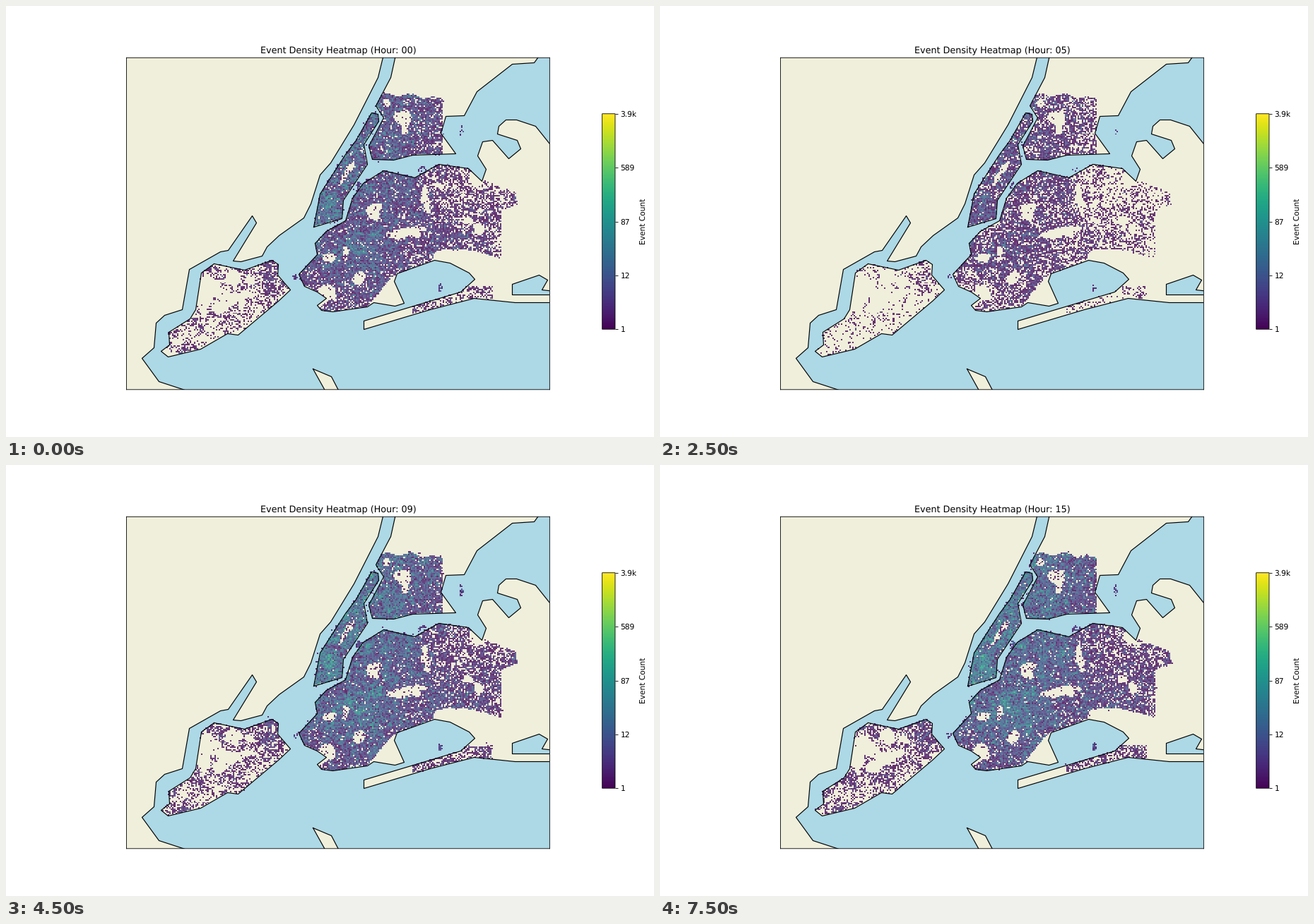
A matplotlib script for the animation above (8000 ms loop, 917 by 611 pixels).

```python
import numpy as np
import matplotlib.pyplot as plt
from matplotlib.animation import FuncAnimation
from matplotlib.cm import ScalarMappable
from matplotlib.colors import Normalize
from matplotlib.path import Path

W, H, DPI = 917, 611, 64
S = 76.4 / DPI                      # keeps text and lines at 12 x 8 inch proportions
HOURS = 16
LAND, WATER = "#f0efdb", "#add8e6"
COLS, ROWS = 250, 195
X0, X1, Y0, Y1 = 215, 725.5, 118, 499

# Map frame: a 0.70 x 0.55 degree window centred in the default subplot area
TOP, BOTTOM = .12 * H, .89 * H
HALF = (BOTTOM - TOP) * .70 / .55 / 2
LEFT, RIGHT = .5125 * W - HALF, .5125 * W + HALF

# Key points of the coast, in stage pixels
MAINLAND = [
    (160, 60), (536, 60), (526, 101), (492, 168), (459, 222), (444, 239), (431, 280),
    (421, 300), (386, 325), (369, 341), (362, 354), (332, 362), (321, 361), (354, 307),
    (348, 297), (314, 346), (303, 348), (259, 373), (249, 430), (224, 438), (212, 449),
    (209, 484), (192, 499), (216, 532), (262, 547), (160, 555)]
UPTOWN = [
    (553, 60), (544, 101), (523, 141), (534, 158), (513, 198), (518, 217), (548, 218),
    (575, 211), (636, 209), (615, 180), (622, 156), (648, 155), (666, 121), (716, 82),
    (747, 80), (760, 62)]
MIDTOWN = [
    (435, 313), (444, 266), (480, 210), (495, 190), (517, 151), (526, 153), (527, 163),
    (506, 196), (511, 224), (477, 275), (475, 301)]
WEST_ISLE = [
    (294, 365), (337, 374), (376, 360), (385, 366), (384, 381), (402, 402), (385, 418),
    (328, 466), (313, 464), (275, 486), (229, 497), (219, 489), (231, 480), (230, 462),
    (260, 443), (268, 430), (276, 378)]
CITY_NORTH = [
    (437, 336), (453, 319), (480, 304), (490, 272), (505, 251), (534, 233), (578, 243),
    (612, 224), (654, 230)]
SOUND = [
    (673, 248), (679, 231), (667, 212), (674, 192), (688, 190), (711, 216), (728, 202),
    (723, 190), (695, 181), (697, 170), (707, 161), (722, 161), (749, 170), (785, 215)]
OCEAN = [
    (785, 405), (758, 402), (766, 388), (754, 381), (716, 394), (716, 409), (785, 409),
    (785, 420), (720, 420), (662, 414), (600, 430), (506, 458), (506, 446), (643, 405)]
BAY = [
    (663, 387), (655, 378), (628, 364), (606, 360), (553, 379), (549, 390), (563, 421),
    (550, 425), (520, 420)]
CITY_SOUTH = [
    (511, 426), (462, 433), (446, 431), (440, 424), (453, 414), (440, 405), (422, 397),
    (414, 380), (440, 352)]
CITY_EAST = [
    (668, 244), (721, 264), (723, 281), (700, 290), (700, 358), (648, 344), (609, 346),
    (604, 360), (548, 382), (519, 416)]
HOOK = [(434, 514), (460, 525), (473, 550), (454, 550)]
LONG_ISLE = CITY_NORTH + SOUND + OCEAN + BAY + CITY_SOUTH

# Parks (x, y, half length, half width, angle) and small islets (x, y, rx, ry)
PARKS = [
    (481, 238, 18, 4, -57), (480, 350, 10, 4, 90), (459, 356, 9, 6, -15),
    (564, 321, 29, 6, -14), (519, 288, 13, 6, -20), (594, 275, 17, 6, 82),
    (564, 170, 14, 4, 90), (281, 405, 27, 12, 98), (311, 422, 32, 9, -28)]
ISLETS = [(644, 178, 3, 9), (590, 234, 7, 7), (614, 400, 3, 6), (677, 403, 10, 6),
          (409, 383, 5, 4), (499, 257, 4, 8)]

gx, gy = np.meshgrid(X0 + (np.arange(COLS) + .5) * (X1 - X0) / COLS,
                     Y0 + (np.arange(ROWS) + .5) * (Y1 - Y0) / ROWS)


def inside(points):
    return Path(points).contains_points(np.c_[gx.ravel(), gy.ravel()]).reshape(gx.shape)


def ellipse(x, y, a, b, deg=0):
    c, s = np.cos(np.radians(deg)), np.sin(np.radians(deg))
    u, v = c * (gx - x) + s * (gy - y), c * (gy - y) - s * (gx - x)
    return np.hypot(u / a, v / b)


def blur(a, s):
    t = np.arange(-int(3 * s) - 1, int(3 * s) + 2)
    k = np.exp(-t ** 2 / (2 * s * s))
    for axis in (0, 1):
        a = np.apply_along_axis(np.convolve, axis, a, k / k.sum(), mode="same")
    return a


def noise(rng, s):
    a = blur(rng.normal(size=gx.shape), s)
    return a / a.std()


def event_rate():
    rng = np.random.default_rng(11)
    fine, patch, broad = noise(rng, .3), noise(rng, 1.4), noise(rng, 4)
    isle, core = inside(WEST_ISLE), inside(MIDTOWN)
    city = inside(CITY_NORTH + CITY_EAST + CITY_SOUTH)
    uptown = inside(UPTOWN) & (gy > 128 + 4 * broad) & (gx < 617)
    beach = inside(LONG_ISLE) & (gx > 574) & (gx < 688) & (gy > 397)

    # Activity falls off on both sides of a north-south spine
    spine = 495 + .23 * (345 - gy)
    busy = 1.9 + 13 * np.exp(-((gx - spine) / 42) ** 2 / 2) / (1 + np.exp((gy - 390) / 14))
    busy += 4 * np.exp(-ellipse(590, 322, 45, 18) ** 2 / 2)
    busy += 3.5 * np.exp(-ellipse(500, 380, 60, 35) ** 2 / 2)
    rate = (city + uptown) * busy + 26 * core + beach
    rate += isle * (.6 + 2 * np.exp(-ellipse(350, 372, 50, 16) ** 2 / 2))
    for spot in ISLETS:
        rate += 1.5 * (ellipse(*spot) < 1)

    quiet = broad < -1.9 + .5 * isle - 2 * core
    for park in PARKS:
        quiet |= ellipse(*park) + .15 * patch < 1
    rate[quiet] *= .015
    rate *= np.exp(.7 * fine + .4 * patch + np.where(isle, .6, .25) * broad)
    return rate + .015 * blur(rate, 1)


RATE = event_rate()


def counts(hour):
    rng = np.random.default_rng(500 + hour)
    daily = np.exp(-2.3 * np.exp(-((hour - 3.4) / 2.9) ** 2))
    burst = rng.gamma(2, .5, gx.shape)
    n = rng.poisson(RATE * daily * burst)
    return np.where(n > 0, np.log1p(n), np.nan)


plt.rcParams.update({"font.family": "DejaVu Sans", "font.size": 10 * S,
                     "axes.linewidth": .8 * S, "path.snap": False,
                     "text.hinting": "none"})
fig = plt.figure(figsize=(W / DPI, H / DPI), dpi=DPI, facecolor="white")

ax = fig.add_axes([LEFT / W, .11, (RIGHT - LEFT) / W, .77], facecolor=WATER)
norm = Normalize(np.log1p(1), np.log1p(3900))
heat = ax.imshow(counts(0), extent=(X0, X1, Y1, Y0), cmap="viridis", norm=norm,
                 alpha=.8, interpolation="nearest", aspect="auto", zorder=2)
for shape in (MAINLAND, UPTOWN, MIDTOWN, WEST_ISLE, LONG_ISLE, HOOK):
    xs, ys = np.array(shape + shape[:1]).T + .5
    ax.fill(xs, ys, color=LAND, lw=0, zorder=1)
    ax.plot(xs, ys, "k", lw=1.1 * S, zorder=3)
ax.set(xlim=(LEFT, RIGHT), ylim=(BOTTOM, TOP), xticks=[], yticks=[])
title = ax.set_title("", fontsize=12 * S, pad=6 * S)

cax = fig.add_axes([.92, .25, .02, .5])
bar = fig.colorbar(ScalarMappable(norm, "viridis"), cax=cax,
                   ticks=np.linspace(norm.vmin, norm.vmax, 5))
cax.set_yticklabels(["1", "12", "87", "589", "3.9k"])
cax.tick_params(length=3.5 * S, width=.8 * S, pad=3.5 * S)
bar.set_label("Event Count", labelpad=4 * S)

FRAMES = [counts(h) for h in range(HOURS)]


def update(hour):
    heat.set_data(FRAMES[hour])
    title.set_text(f"Event Density Heatmap (Hour: {hour:02d})")
    return heat, title


anim = FuncAnimation(fig, update, frames=HOURS, interval=500,
                     repeat=True, repeat_delay=0, blit=False)
plt.show()
```
